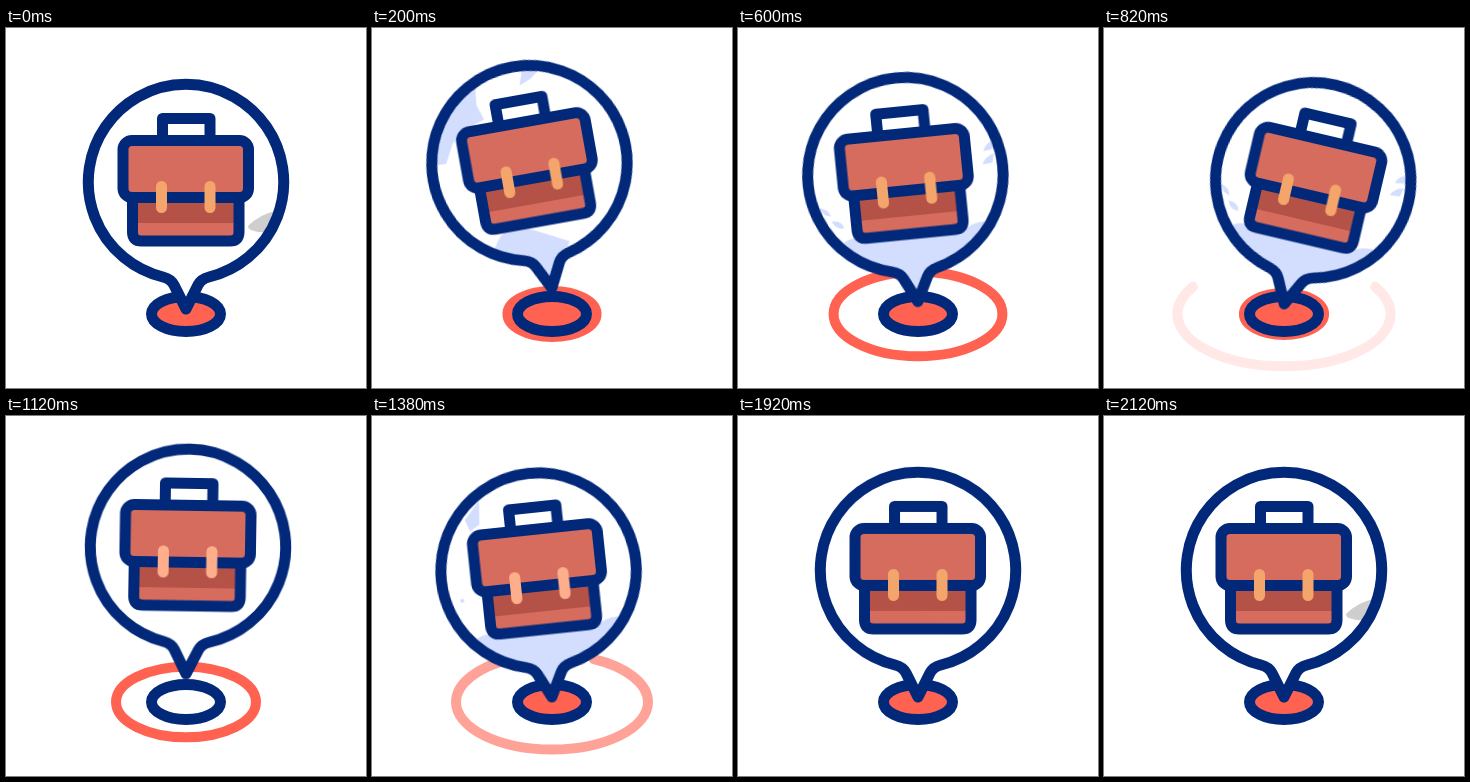
Write an HTML page that moves like this. It is 360 px wide and 360 px high and loops after 2.4 s.

```html
<!DOCTYPE html>
<html lang="en">
<head>
<meta charset="utf-8">
<title>Job location pin</title>
<style>
  html, body { margin: 0; width: 100%; height: 100%; overflow: hidden; background: #fff; }
  svg { display: block; width: 100vw; height: 100vh; }

  .line { stroke: #02287a; stroke-width: 11; stroke-linejoin: round; stroke-linecap: round; fill: none; }
  .pale { fill: #d3ddfd; }
  .leather { fill: #d56c5d; }
  .dark { fill: #b55248; }
  .coral { fill: #ff6250; }

  .lift, .swing, .ripple, .strap, .show { animation: 2.4s infinite both; }

  /* the bounce and the swing ease like half cosine waves */
  .lift, .swing { animation-timing-function: cubic-bezier(.364, 0, .636, 1); }
  .lift { animation-name: lift; }
  .swing { animation-name: swing; transform-origin: 180px 282px; }
  @keyframes lift {
    0%, 30%, 57.1%, 80.4%, 100% { transform: translateY(0); }
    14.3% { transform: translateY(-33px); }
    44.2% { transform: translateY(-25.5px); }
    68.75% { transform: translateY(-20.4px); }
  }
  @keyframes swing {
    0%, 80.4%, 100% { transform: rotate(0deg); }
    15.6% { transform: rotate(-18.2deg); }
    38.4% { transform: rotate(16deg); }
    52.9% { transform: rotate(-8.6deg); }
    68.75% { transform: rotate(4.5deg); }
  }

  /* a ring grows, then fades while opening at the top */
  .ripple {
    fill: none; stroke: #ff6250; stroke-width: 10; stroke-linecap: round;
    animation-name: ripple; animation-timing-function: linear;
  }
  .second { animation-delay: .665s; }
  @keyframes ripple {
    0%, 4.37% { opacity: 0; rx: 35px; ry: 18.5px; stroke-dasharray: 360 0; stroke-dashoffset: 90; }
    4.38% { opacity: 1; rx: 35px; ry: 18.5px; }
    25.7% { opacity: 1; rx: 86px; ry: 43px; stroke-dasharray: 360 0; stroke-dashoffset: 90; }
    34.8% { opacity: .08; rx: 108px; ry: 53px; stroke-dasharray: 216 144; stroke-dashoffset: 18; }
    34.81%, 100% { opacity: 0; rx: 108px; ry: 53px; stroke-dasharray: 216 144; stroke-dashoffset: 18; }
  }

  .strap { stroke-width: 11; stroke-linecap: round; animation-name: strap; animation-timing-function: step-end; }
  @keyframes strap {
    0%, 79%, 100% { stroke: #f4a56b; }
    41.6% { stroke: #ffae8c; }
    65% { stroke: #dc8270; }
  }

  .show { animation-timing-function: step-end; }
  .floor { animation-name: floor; }
  .glint { animation-name: glint; }
  .early { animation-name: early; }
  .pool { animation-name: pool; }
  .drops { animation-name: drops; }
  .strip { animation-name: strip; }
  .late { animation-name: late; }
  .rest { animation-name: rest; }
  @keyframes floor { 0%, 25%, 53% { opacity: 1; } 17.6%, 45% { opacity: 0; } }
  @keyframes glint { 0%, 17.6% { opacity: 0; } 15% { opacity: 1; } }
  @keyframes early { 0%, 24% { opacity: 0; } 8% { opacity: 1; } }
  @keyframes pool { 0%, 41%, 65% { opacity: 0; } 24%, 52% { opacity: 1; } }
  @keyframes drops { 0%, 41% { opacity: 0; } 24% { opacity: 1; } }
  @keyframes strip { 0%, 65% { opacity: 0; } 52% { opacity: 1; } }
  @keyframes late { 0%, 79% { opacity: 0; } 65% { opacity: 1; } }
  @keyframes rest { 0%, 82% { opacity: 1; } 2.5% { opacity: 0; } }
</style>
</head>
<body>
<svg viewBox="0 0 360 360">
  <defs>
    <path id="pin" d="M157 249A97.7 97.7 0 1 1 203 249Q195 251 192 257L180 281L168 257Q165 251 157 249Z"/>
    <clipPath id="inside"><use href="#pin"/></clipPath>
  </defs>

  <ellipse class="ripple" cx="180" cy="286" rx="35" ry="18.5" pathLength="360"/>
  <ellipse class="ripple second" cx="180" cy="286" rx="35" ry="18.5" pathLength="360"/>

  <!-- ground spot -->
  <ellipse cx="180" cy="286" rx="34.5" ry="17.5" fill="#fff"/>
  <ellipse class="coral show floor" cx="180" cy="286" rx="34.5" ry="17.5"/>
  <path class="show glint" fill="#fff" d="M187 279L198 278L207 284L206 290L194 290L190 285Z"/>
  <ellipse class="line" cx="180" cy="286" rx="34.5" ry="17.5"/>

  <g class="lift"><g class="swing">
    <use href="#pin" fill="#fff"/>

    <!-- reflections -->
    <g class="pale" clip-path="url(#inside)">
      <path class="show early" d="M86 140L100 104Q116 80 140 70L138 88L143 103L122 110L108 121L98 140Z
        M190 58L208 62L196 71L184 76Z
        M130 234Q140 214 156 213L175 222L206 238L196 252L180 276L162 252Z"/>
      <path class="show pool" d="M106 221Q116 209 130 213L232 215Q244 206 258 208L240 250L180 282L120 250Z"/>
      <path class="show drops" d="M90 178Q100 180 102 188L96 186ZM102 193Q112 192 114 201Q106 202 102 193Z
        M274 126Q262 130 260 138L272 136ZM270 141Q260 144 258 151L268 150Z"/>
      <path class="show strip" d="M112 96L128 78L126 102L116 108ZM99 176a2 2 0 1 0 4 0a2 2 0 1 0-4 0"/>
      <path class="show late" d="M131 214Q150 212 172 216Q192 226 191 238Q180 247 162 242L130 226Z
        M250 199Q258 191 268 193L262 204Z"/>
      <path class="show rest" fill="#cecece" d="M242 198Q254 186 270 183L266 203Q252 206 243 201Z"/>
    </g>
    <use href="#pin" class="line"/>

    <!-- briefcase -->
    <path class="line" d="M156.5 112V90.5H204V112"/>
    <path class="dark" d="M127 169H233V196H127Z"/>
    <path class="leather" d="M127 195H233V205Q233 213 225 213H135Q127 213 127 205Z"/>
    <path class="line" d="M126.5 169V204Q126.5 213 135.5 213H224Q233 213 233 204V169"/>
    <rect class="leather" x="117" y="112.5" width="125.5" height="57" rx="9"/>
    <rect class="line" x="117" y="112.5" width="125.5" height="57" rx="9"/>
    <path class="strap" d="M155.5 158.5V179.5M204 158.5V179.5"/>
  </g></g>
</svg>
</body>
</html>
```
